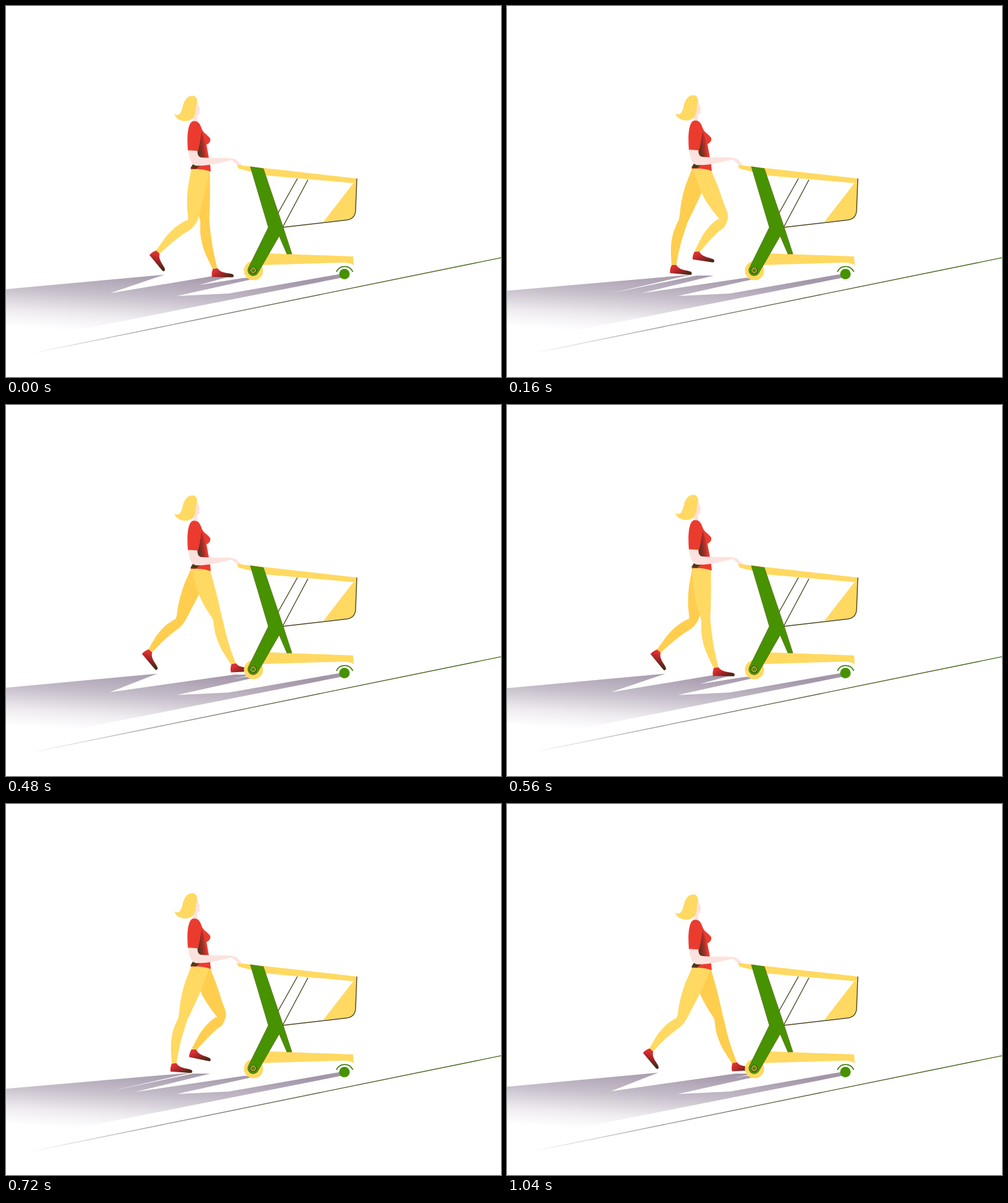
Animation, 800 px wide and 600 px high, one loop 1.12 s. Source, as an HTML page:

```html
<!DOCTYPE html>
<html lang="en">
<head>
<meta charset="utf-8">
<title>Walking with a cart</title>
<style>
html, body { margin: 0; width: 100%; height: 100%; overflow: hidden; background: #fff; }
svg { display: block; width: 800px; height: 600px; }
</style>
</head>
<body>
<svg viewBox="0 0 800 600">
  <defs>
    <linearGradient id="shade" gradientUnits="userSpaceOnUse" x1="300" y1="432" x2="293" y2="537">
      <stop offset="0" stop-color="#a396a9"/>
      <stop offset=".4" stop-color="#c5bdc9"/>
      <stop offset=".75" stop-color="#efecf0"/>
      <stop offset="1" stop-color="#fff"/>
    </linearGradient>
    <linearGradient id="road" gradientUnits="userSpaceOnUse" x1="40" y1="0" x2="800" y2="0">
      <stop offset="0" stop-color="#fff"/>
      <stop offset=".35" stop-color="#86807c"/>
      <stop offset=".7" stop-color="#47561f"/>
      <stop offset="1" stop-color="#3f6a12"/>
    </linearGradient>
    <linearGradient id="leather" x1="0" y1="0" x2="1" y2=".6">
      <stop offset=".25" stop-color="#dc3030"/>
      <stop offset=".65" stop-color="#9a2426"/>
      <stop offset="1" stop-color="#4a2a18"/>
    </linearGradient>
    <linearGradient id="fold" x1="0" y1=".8" x2="1" y2=".5">
      <stop offset=".1" stop-color="#50391a"/>
      <stop offset=".45" stop-color="#8f2c26"/>
      <stop offset="1" stop-color="#eb3b2f"/>
    </linearGradient>
    <path id="shoe" fill="url(#leather)" d="M-3.500 0 L4 -1 C9 7 20 6 27 8 C31 9 31 13 28 13.500 L-5 13 C-6 8 -5 4 -3.500 0Z"/>
  </defs>

  <path id="shadow" fill="url(#shade)"/>
  <path d="M40 562 L800 407.200" stroke="url(#road)" stroke-width="1.3"/>

  <g id="far" fill="#ffce4f"><path/><use href="#shoe"/></g>
  <g id="near" fill="#ffd961"><path/><use href="#shoe"/></g>

  <g id="body">
    <path fill="#fce2de" d="M306 150 L310 158 L314 167 L312.500 169 L313 174 L309 177 Q308 183 311 190 L301 189 Q304 180 302 160Z"/>
    <path fill="#ffd961" d="M301 145 C307 145 309 150 309 155 C306 162 308 172 303 180 C298 187 283 188 276 181 Q273 178 272 174 C278 179 283 174 285 165 C287 154 292 145 301 145Z"/>
    <path fill="#eb3b2f" d="M303 186 C294 187 292 209 294 234 L309 236 L309 246 L298 264 Q315 262 331 267.500 L330 257 L324 224 C329 222 331 218 330 214 C326 208 320 206 317 200 C314 192 312 185 303 186Z"/>
    <path fill="url(#fold)" d="M316 203 C314 220 311 230 309 242 L314 246 L325 245 L322 226 C322 216 319 212 316 203Z"/>
    <path fill="#50391a" d="M298 262 L303 254 L313 258 L307 263.500Z"/>
    <path fill="#fce2de" d="M294.500 233 C296 248 299 259 311 258 C330 258 350 252 365 249 L376 258 L382 257.500 L371 247.500 C360 244 345 246 320 245 C311 245 310 242 309 234Z"/>
  </g>

  <g id="cart">
    <path fill="#ffd961" d="M373 257 L567 279 L567 287 L420 274 L376 263Z M561 287 L513 349 L552 345 Q565 343 565 331 L567 287Z"/>
    <path fill="#ffd961" d="M425 400 L561 405 L562 419.500 Q557 415 545 415 L412 419Z"/>
    <g fill="none" stroke="#4b471d" stroke-width="1.400">
      <path d="M471 279 L439 336 M488 281 L447 358"/>
      <path d="M567 279 L565 331 Q564 344 551 346 L447 358"/>
    </g>
    <circle cx="400" cy="428" r="15.500" fill="#ffd961"/>
    <path fill="#479200" stroke="#5c6a17" stroke-width=".8" d="M395 260 L416 263 L449 361 L462 401 L454 401 L441.500 372 L407.500 431 A8.500 8.500 0 0 1 391.500 424 L424 358Z"/>
    <circle cx="399.500" cy="427.500" r="4.200" fill="#479200" stroke="#3a3a12" stroke-width="2.600"/>
    <circle cx="399.500" cy="427.500" r="3.800" fill="none" stroke="#ffd961" stroke-width="1.200"/>
    <circle cx="547" cy="433.500" r="8.500" fill="#479200"/>
    <path fill="none" stroke="#3f7d08" stroke-width="1.800" d="M534 430 A14.500 14.500 0 0 1 560.500 430"/>
  </g>
</svg>
<script>
const STEP = 80, STEPS = 14, TURN = 2 * Math.PI;
const { sin, cos, PI } = Math;

const $ = id => document.getElementById(id);
const at = p => p.map(v => v.toFixed(2)).join(' ');

// sum of harmonics: [multiple, amplitude, lead]
const wave = (angle, mean, ...parts) =>
  parts.reduce((sum, [n, size, lead]) => sum + size * sin(n * angle + lead), mean);

// half widths of a leg at fraction f of each bone
const thighBack = f => -(15 + 9 * f - 18 * f * f);
const thighFront = f => 14 - 6.5 * f ** 1.5;
const shinBack = f => -(6.8 - 3 * f + 6 * sin(PI * f ** .85));
const shinFront = f => 8.2 - 12 * f + 7.6 * f * f;

// a leg swings forward in the first half of its turn and carries in the second
function stride(a) {
  const knee = [
    wave(a, 315, [1, 44.8, -.18], [2, 4.4, -1.24], [3, 4.9, -.45]),
    wave(a, 348.3, [1, -2.5, 0], [2, 1.5, PI / 2])
  ];
  const ankle = [
    wave(a, 295.8, [1, 65.7, -.72], [2, -10.2, .44], [3, 7.2, -.45]),
    wave(a, 410.5, [1, -13.9, 1.32], [4, 2.2, .59])
  ];
  const tilt = wave(a, 12.3, [1, 30.8, 2.21], [2, 13, 1.81], [3, 3.9, 0]);
  const rad = tilt * PI / 180;
  return { knee, ankle, tilt, toe: ankle[0] + 29 * cos(rad) - 10 * sin(rad) };
}

// smooth curve through the points
function curve(pts) {
  return pts.slice(1).map((p, i) => {
    const o = pts[i], before = pts[i - 1] || o, after = pts[i + 2] || p;
    const c1 = o.map((v, k) => v + (p[k] - before[k]) / 6);
    const c2 = p.map((v, k) => v - (after[k] - o[k]) / 6);
    return `C${at(c1)} ${at(c2)} ${at(p)}`;
  }).join('');
}

function edge(from, to, stops, width) {
  const dx = to[0] - from[0], dy = to[1] - from[1], len = Math.hypot(dx, dy);
  return stops.map(f => {
    const w = width(f) / len;
    return [from[0] + dx * f + dy * w, from[1] + dy * f - dx * w];
  });
}

function drawLeg(group, { knee, ankle, tilt }, bob) {
  const hip = [315, 265 + bob];
  const side = (x, y, thigh, shin) => [
    [x, y + bob],
    ...edge(hip, knee, [.4, .7, .95], thigh),
    ...edge(knee, ankle, [.1, .3, .6, 1], shin)
  ];
  const back = side(299.5, 263, thighBack, shinBack);
  const front = side(329.5, 265, thighFront, shinFront).reverse();
  group.children[0].setAttribute('d', `M${at(back[0])}${curve(back)}L${at(front[0])}${curve(front)}Z`);
  group.children[1].setAttribute('transform', `translate(${at(ankle)}) rotate(${tilt.toFixed(2)})`);
}

// the feet pull the tips of the shadow, the gap between them opens with the stride
function drawShadow(toeA, toeB) {
  const rear = Math.min(toeA, toeB), front = Math.max(toeA, toeB);
  const gap = 170 + 1.28 * (front - rear);
  const outline = [
    0, 457 + (rear - 240) / 17, rear, 434.5, 168, 464.5,
    front - 28, 436, front, 436, gap, 464.5 - .142 * (gap - 218),
    386, 439.5, 402, 441, 276, 469, 360, 465, 540, 433.5, 545, 439, 70, 533, 0, 547
  ];
  $('shadow').setAttribute('d', `M${at(outline)}Z`);
}

function draw(now) {
  const step = Math.floor(now / STEP) % STEPS;
  const beat = step / STEPS * TURN;
  const angle = beat + .09 * sin(beat / 1) ** 5; // the near leg swings a touch faster
  const bob = .5 - 1.2 * cos(2 * beat - 1.44);
  const near = stride(angle), far = stride(angle + PI);
  drawShadow(near.toe, far.toe);
  drawLeg($('far'), far, bob);
  drawLeg($('near'), near, bob);
  $('body').setAttribute('transform', `translate(0 ${bob.toFixed(2)})`);
}

let start;
function tick(now) {
  start ??= now;
  draw(now - start);
  requestAnimationFrame(tick);
}
draw(0);
requestAnimationFrame(tick);
</script>
</body>
</html>
```
